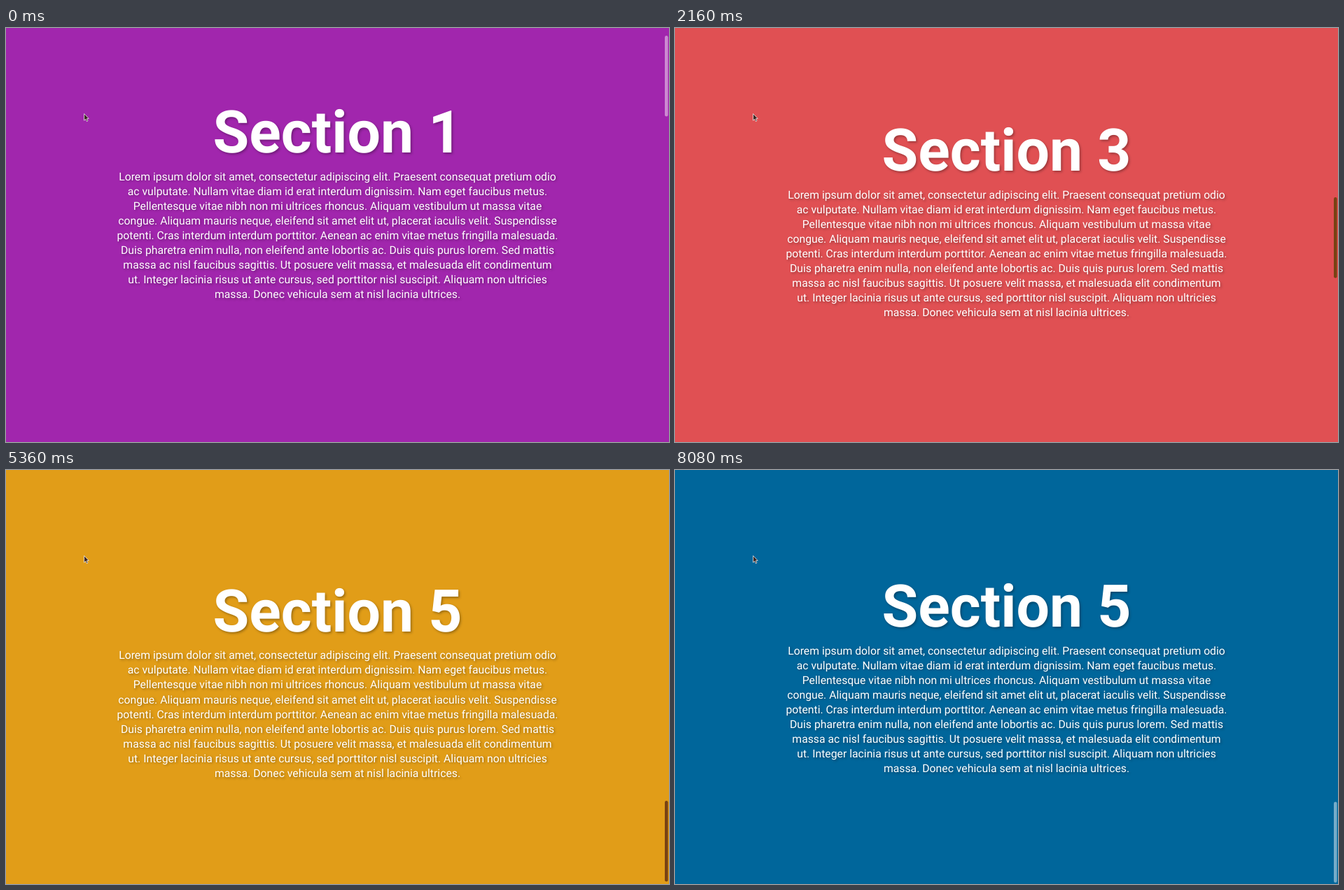
These frames come from a looping animation (947 by 592 pixels, 8.16 s). An HTML page with a canvas:

```html
<!DOCTYPE html>
<html lang="en">
<head>
<meta charset="utf-8">
<title>Scrolling sections</title>
<style>
  html, body { margin: 0; width: 100%; height: 100%; overflow: hidden; background: #a126ad; }
  canvas { display: block; }
</style>
</head>
<body>
<canvas id="stage" width="947" height="592"></canvas>
<script>
const W = 947, H = 592, LOOP = 8160, STEP = 80;
const ctx = document.getElementById('stage').getContext('2d');

const SCALE = W / 1080;
const SECTION = 546, PAGE = H * 0.9, END = SECTION * 5 - H;
const SCROLL_MS = 150, FADE_MS = 150;

const LINES = [
  'Lorem ipsum dolor sit amet, consectetur adipiscing elit. Praesent consequat pretium odio',
  'ac vulputate. Nullam vitae diam id erat interdum dignissim. Nam eget faucibus metus.',
  'Pellentesque vitae nibh non mi ultrices rhoncus. Aliquam vestibulum ut massa vitae',
  'congue. Aliquam mauris neque, eleifend sit amet elit ut, placerat iaculis velit. Suspendisse',
  'potenti. Cras interdum interdum porttitor. Aenean ac enim vitae metus fringilla malesuada.',
  'Duis pharetra enim nulla, non eleifend ante lobortis ac. Duis quis purus lorem. Sed mattis',
  'massa ac nisl faucibus sagittis. Ut posuere velit massa, et malesuada elit condimentum',
  'ut. Integer lacinia risus ut ante cursus, sed porttitor nisl suscipit. Aliquam non ultricies',
  'massa. Donec vehicula sem at nisl lacinia ultrices.'
];

// Page-down presses, and the background fades they set off
const PRESSES = [500, 1908, 3290, 4680, 6040];
const FADES = [
  { at: 620, rgb: [8, 150, 230] },
  { at: 2040, rgb: [229, 78, 79], dark: true },
  { at: 3438, rgb: [225, 157, 24], dark: true },
  { at: 6183, rgb: [0, 102, 155] }
];
const FIRST = { rgb: [161, 38, 173] };

const clamp = v => Math.min(1, Math.max(0, v));

function bezier(x1, y1, x2, y2) {
  const at = (a, b, u) => 3 * a * u * (1 - u) ** 2 + 3 * b * u * u * (1 - u) + u ** 3;
  return x => {
    if (x <= 0 || x >= 1) return clamp(x);
    let lo = 0, hi = 1;
    for (let i = 0; i < 30; i++) {
      const mid = (lo + hi) / 2;
      if (at(x1, x2, mid) < x) lo = mid; else hi = mid;
    }
    return at(y1, y2, lo);
  };
}
const ease = bezier(0.25, 0.1, 0.25, 1);
const scrollEase = bezier(0, 0, 0.6, 1);

function scrollAt(t) {
  let y = 0;
  PRESSES.forEach((start, i) => {
    const goal = Math.min(END, PAGE * (i + 1));
    const from = PAGE * i;
    y += (goal - from) * scrollEase((t - start) / SCROLL_MS);
  });
  return y;
}

function backdropAt(t) {
  let rgb = FIRST.rgb, dark = false;
  for (const fade of FADES) {
    const p = ease((t - fade.at) / FADE_MS);
    rgb = rgb.map((c, i) => c + (fade.rgb[i] - c) * p);
    if (p > 0.5) dark = !!fade.dark;
  }
  return { color: `rgb(${rgb.map(Math.round).join()})`, dark };
}

function shadow(on) {
  ctx.shadowColor = on ? 'rgba(0,0,0,0.3)' : 'transparent';
  ctx.shadowOffsetX = ctx.shadowOffsetY = on ? 2 * SCALE : 0;
  ctx.shadowBlur = on ? 4 * SCALE : 0;
}

function drawSection(n, top) {
  if (top > H || top + SECTION < 0) return;
  ctx.fillStyle = '#fff';
  ctx.textAlign = 'center';
  ctx.textBaseline = 'alphabetic';
  ctx.font = `bold ${96 * SCALE}px Roboto, sans-serif`;
  ctx.fillText('Section ' + n, W / 2, top + 178);
  ctx.font = `${18 * SCALE}px Roboto, sans-serif`;
  LINES.forEach((line, i) => ctx.fillText(line, W / 2, top + 217.6 + i * 24 * SCALE));
}

function drawThumb(scroll, dark) {
  ctx.fillStyle = dark ? '#774213' : 'rgba(255,255,255,0.46)';
  ctx.beginPath();
  ctx.roundRect(941, 11 + scroll * 0.2168, 4.6, 115.5, 2.3);
  ctx.fill();
}

function drawCursor() {
  ctx.beginPath();
  [[111.6, 122.6], [111.6, 132.2], [113.8, 130.3], [115.3, 133.6],
   [116.9, 132.9], [115.5, 129.7], [118.2, 129.5]].forEach(p => ctx.lineTo(...p));
  ctx.closePath();
  ctx.fillStyle = '#3a2420';
  ctx.fill();
  ctx.strokeStyle = 'rgba(255,255,255,0.8)';
  ctx.lineWidth = 0.9;
  ctx.stroke();
}

function draw(now) {
  const t = Math.floor((now % LOOP) / STEP) * STEP;
  const scroll = scrollAt(t), back = backdropAt(t);
  ctx.fillStyle = back.color;
  ctx.fillRect(0, 0, W, H);
  ctx.textRendering = 'geometricPrecision';
  shadow(true);
  for (let n = 1; n <= 5; n++) drawSection(n, (n - 1) * SECTION - scroll);
  shadow(false);
  drawThumb(scroll, back.dark);
  drawCursor();
}

const begin = performance.now();
function tick() {
  draw(performance.now() - begin);
  requestAnimationFrame(tick);
}
tick();
</script>
</body>
</html>
```
